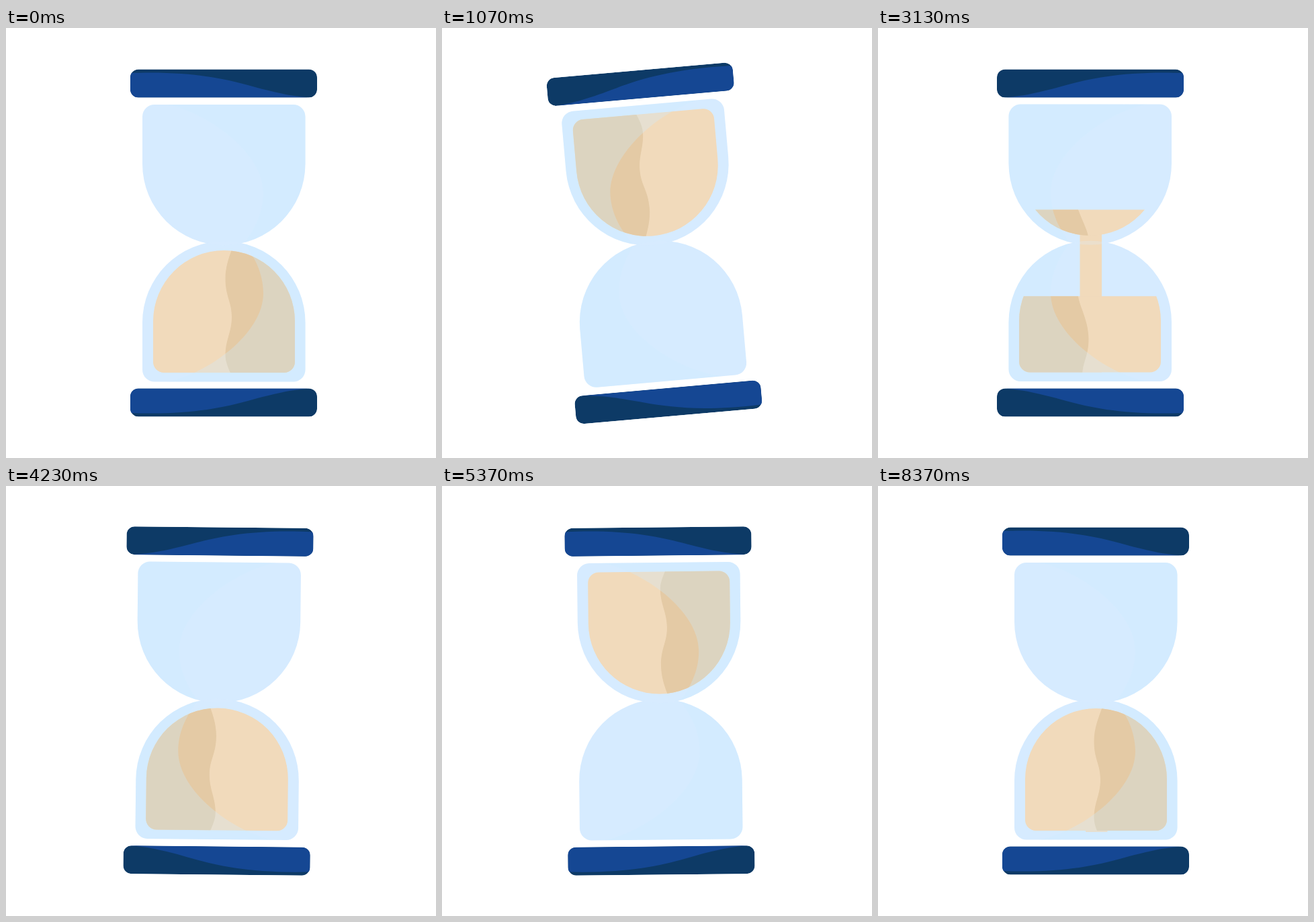
Recreate the animation shown at these times as an HTML page with a canvas. Size 640 px wide and 640 px high, loop 8.61 s.

```html
<!DOCTYPE html>
<html lang="en">
<head>
<meta charset="utf-8">
<title>Hourglass</title>
<style>
html, body { margin: 0; width: 100%; height: 100%; overflow: hidden; background: #fff; }
canvas { display: block; }
</style>
</head>
<body>
<canvas id="stage" width="640" height="640"></canvas>
<script>
const g = document.getElementById('stage').getContext('2d');
const LOOP = 8610, HALF = 105, TURN = 30;

// Every part is described for the lower half; the upper half is its mirror image.
const bulb = new Path2D('M203 438.5A121 121 0 0 1 445.5 438.5V508.5A18 18 0 0 1 427.5 526.5H221A18 18 0 0 1 203 508.5Z');
const cavity = new Path2D('M219 436.5A105.5 105.5 0 0 1 430 436.5V497A16 16 0 0 1 414 513H235A16 16 0 0 1 219 497Z');
const shine = new Path2D('M240 526.5C300 515 383 455 383 395C383 365 370 340 352 317H460V527Z');
const shade = new Path2D('M342 309.5C340 325 326.5 346 326.5 373S336 407 336 430S326.5 464 326.5 487C326.5 500 334 512 342 533H450V309.5Z');
const bar = new Path2D();
bar.roundRect(185, 536.5, 278, 42, 12);
const barLight = new Path2D('M185 573C270 576 320 566 360 555S425 538 455 536.5H185Z');

function fill(path, color) {
  g.fillStyle = color;
  g.fill(path);
}

function scoped(draw) {
  g.save();
  draw();
  g.restore();
}

function mirrored(flip, axis, draw) {
  scoped(() => {
    if (flip) g.transform(1, 0, 0, -1, 0, 2 * axis);
    draw();
  });
}

const inBulb = (flip, draw) => mirrored(flip, 320.25, draw);

function bothHalves(axis, draw) {
  for (const flip of [false, true]) mirrored(flip, axis, draw);
}

function sand(dx, dy) {
  g.clip(cavity);
  g.translate(dx, dy);
  g.fillStyle = '#f1dabb';
  g.fillRect(190, 309.5, 270, 223.5);
  fill(shade, '#e4caa5');
}

function stream(second, r) {
  const top = Math.max(307, 309 + (r - 95.5) * 20);
  const end = Math.min(second ? 515 : 513, 309 + (r - 35) * 20.5);
  g.fillStyle = '#f1dabb';
  if (r > 35 && end > top) g.fillRect(second ? 309 : 307, top, 32.5, end - top);
}

function drawBar() {
  g.clip(bar);
  fill(bar, '#0d3a66');
  fill(barLight, '#154793');
}

function drawShine() {
  g.clip(bulb);
  fill(shine, 'rgba(201,234,255,.3)');
}

function draw(frame) {
  const second = frame >= HALF;
  const r = frame % HALF;
  const p = Math.min(r / TURN, 1);
  const turn = p * p * (3 - 2 * p);
  const drained = r < TURN ? 0 : second ? 3.41 * (r - 30) : 6.5 + 3.27 * (r - 30);
  const left = second ? 3.35 * (106.1 - r) : 3.34 * (105 - r);

  g.fillStyle = '#fff';
  g.fillRect(0, 0, 640, 640);
  scoped(() => {
    g.translate(320, 320);
    g.rotate((turn + second) * Math.PI);
    g.translate(-320, -320);

    bothHalves(320, drawBar);
    bothHalves(320.25, () => fill(bulb, '#d6ebff'));
    inBulb(!second, () => stream(second, r));
    inBulb(second, () => sand(0, -drained));
    if (r >= 45) inBulb(!second, () => sand(second ? -5 : 0, left));
    bothHalves(320.25, drawShine);

    // Thin lens where the two bulbs overlap.
    inBulb(false, () => {
      g.clip(bulb);
      inBulb(true, () => fill(bulb, 'rgba(214,235,255,.25)'));
    });
  });
}

// 25 poses a second, shown on a 30 fps clock; the last pose is held.
function tick(now) {
  const t = Math.floor(now % LOOP / 10);
  const n = Math.min(251, Math.floor(t * 0.3 + 0.11));
  draw(Math.ceil(n * 25 / 30 - 0.5001));
  requestAnimationFrame(tick);
}
tick(performance.now());
</script>
</body>
</html>
```
